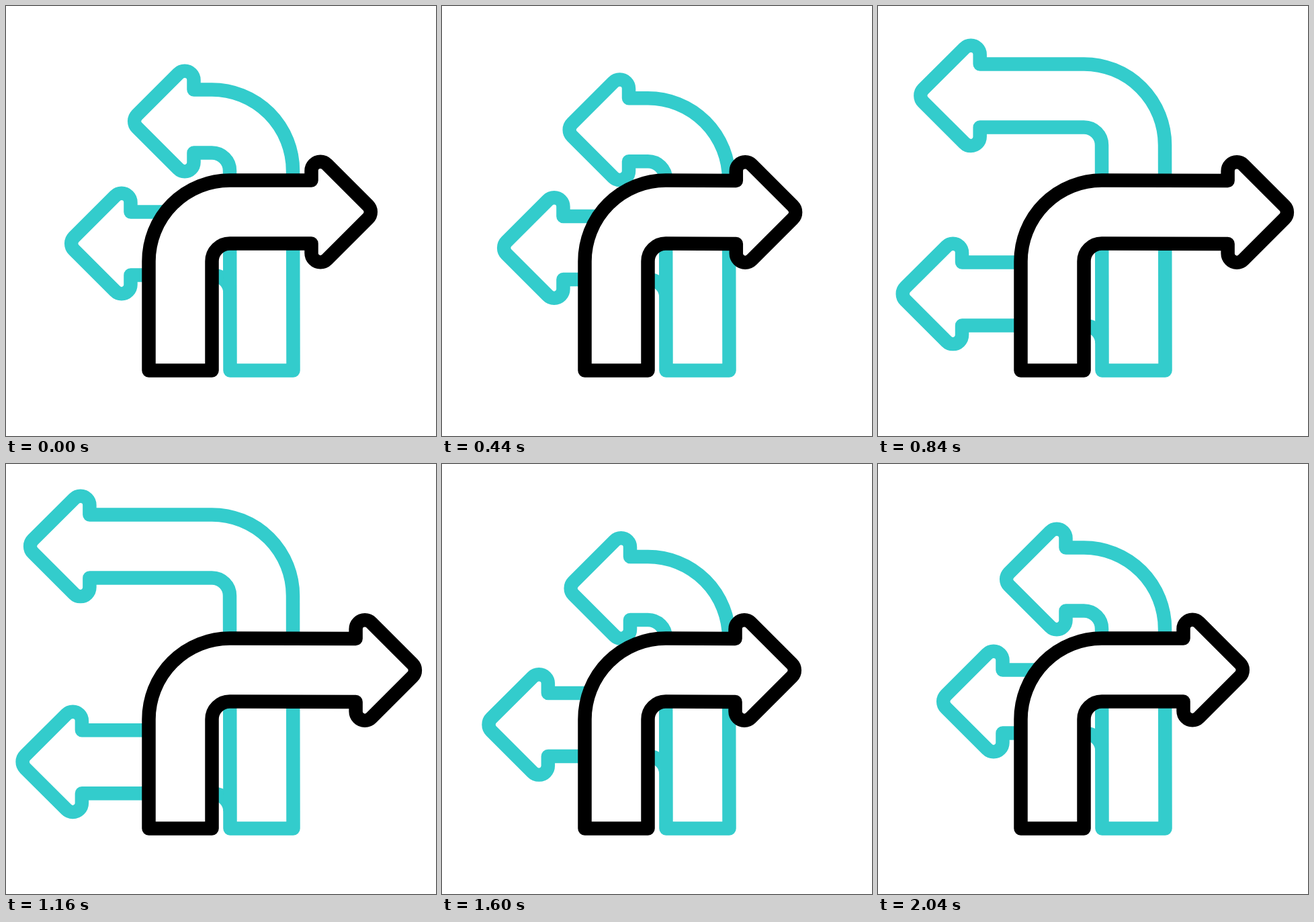
Animation, 640 px wide and 640 px high, one loop 2.2 s. Source, as an HTML page with a canvas:

```html
<!DOCTYPE html>
<html lang="en">
<head>
<meta charset="utf-8">
<title>Turning arrows</title>
<style>
html, body { margin: 0; width: 100%; height: 100%; overflow: hidden; background: #fff; }
canvas { display: block; width: 640px; height: 640px; }
</style>
</head>
<body>
<canvas id="stage" width="640" height="640"></canvas>
<script>
const ctx = document.getElementById('stage').getContext('2d');
const SIZE = 640, LOOP = 2200, STEP = 40;
const TEAL = '#33cccc', BLACK = '#000';

// Arrow geometry: a shaft that rises from its base and bends to the left.
const LEFT = 333.5, WIDTH = 94, RIGHT = LEFT + WIDTH, BASE = 542.5;
const BEND = 307, OUTER = 120.5, INNER = OUTER - WIDTH;
const CORNER = 13.5, NOTCH = 98.5, RISE = 14.2, STROKE = 20.5;

// Shared beats: wind up, then stretch out, return and settle.
const START = 200, WOUND = 400, END = 2020;

const clamp = u => Math.min(1, Math.max(0, u));
const smooth = u => u * u * (3 - 2 * u);

// Timing curve with horizontal tangents; x is the reach of the second handle.
function softLanding(x) {
  return u => {
    let lo = 0, hi = 1;
    for (let i = 0; i < 30; i++) {
      const s = (lo + hi) / 2, r = 1 - s;
      if (r * r * s + 3 * r * s * s * x + s ** 3 < u) lo = s; else hi = s;
    }
    return smooth(lo);
  };
}

const ramp = (t, from, to, ease = smooth) => ease(clamp((t - from) / (to - from)));

const low = {
  color: TEAL, tip: 87, top: 306.5, wind: { x: -4.5, y: 5.8 }, stretch: { x: -68.2, y: 84.2 },
  out: 1200, turn: 1320, home: 1780, ease: softLanding(0.25), headOnly: true
};
const high = {
  color: TEAL, tip: 181, top: 124.5, wind: { x: 0.5, y: 13.5 }, stretch: { x: -155.6, y: -62.6 },
  out: 1000, turn: 1200, home: 1600, bend: BEND - 0.5
};
const front = {
  color: BLACK, tip: 87, top: 259.5, wind: { x: 18, y: 0.5 }, stretch: { x: -102, y: 0 },
  out: 1000, turn: 1000, home: 1600, pinned: true
};

function drawArrow(arrow, t) {
  const wind = ramp(t, START, WOUND) - ramp(t, arrow.home, END);
  const stretch = ramp(t, WOUND, arrow.out, arrow.ease) - ramp(t, arrow.turn, arrow.home);
  const tip = arrow.tip + wind * arrow.wind.x + stretch * arrow.stretch.x;
  const top = arrow.top + wind * arrow.wind.y + stretch * arrow.stretch.y;
  const { bend = BEND } = arrow;
  const bendY = (arrow.pinned ? arrow.top : top) + OUTER;
  const bottom = top + WIDTH, notch = tip + NOTCH, headX = notch - CORNER;
  const right = Math.PI / 2, slant = Math.PI * 3 / 4;

  ctx.beginPath();
  if (arrow.headOnly) {
    ctx.moveTo(260, top);
  } else {
    ctx.moveTo(RIGHT, BASE);
    ctx.arc(bend, bendY, OUTER, 0, -right, true);
  }
  ctx.lineTo(notch, top);
  ctx.arc(headX, top - RISE, CORNER, 0, -slant, true);
  ctx.arc(tip + 23.7, top + WIDTH / 2, CORNER, -slant, slant, true);
  ctx.arc(headX, bottom + RISE, CORNER, slant, 0, true);
  ctx.lineTo(notch, bottom);
  ctx.arc(bend, bendY, INNER, -right, 0);
  if (!arrow.headOnly) {
    ctx.lineTo(LEFT, BASE);
    ctx.closePath();
  }
  ctx.fillStyle = '#fff';
  ctx.fill();
  ctx.strokeStyle = arrow.color;
  ctx.stroke();
}

function draw(t) {
  ctx.fillStyle = '#fff';
  ctx.fillRect(0, 0, SIZE, SIZE);
  ctx.lineWidth = STROKE;
  ctx.lineJoin = 'round';
  drawArrow(low, t);
  drawArrow(high, t);
  ctx.save();
  ctx.translate(SIZE, 0);
  ctx.scale(-1, 1);
  drawArrow(front, t);
  ctx.restore();
}

const begin = performance.now();
function tick() {
  const t = (performance.now() - begin) % LOOP;
  draw(Math.floor(t / STEP) * STEP);
  requestAnimationFrame(tick);
}
tick();
</script>
</body>
</html>
```
